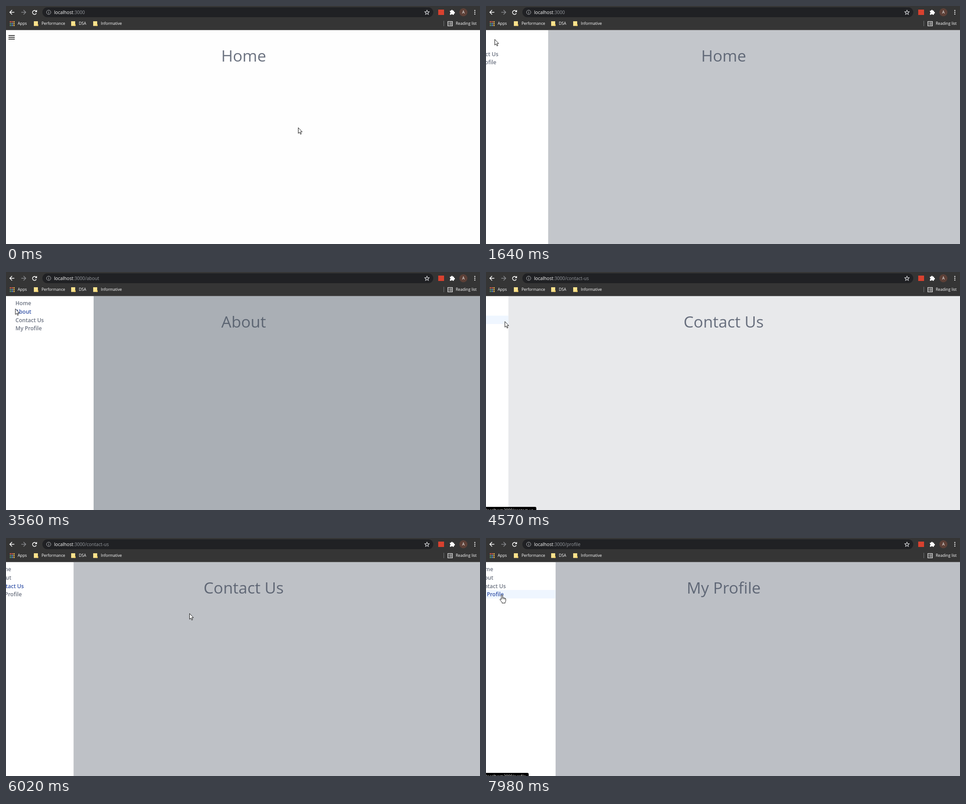
An HTML page with a canvas that plays this animation: 1055 by 531 pixels, repeating every 8000 ms.

```html
<!DOCTYPE html>
<html lang="en">
<head>
<meta charset="utf-8">
<title>Drawer navigation</title>
<style>
html, body { margin: 0; width: 100%; height: 100%; overflow: hidden; background: #fff; }
canvas { display: block; }
</style>
</head>
<body>
<canvas id="stage" width="1055" height="531"></canvas>
<script>
const W = 1055, H = 531, LOOP = 8000, TOP = 54;
const g = document.getElementById('stage').getContext('2d');
const FONT = '"Open Sans", "Noto Sans", sans-serif';

const DRAWER = 195, SLIDE = 300, DIM = 0.47, ROW = 18.7;
const MENU = ['Home', 'About', 'Contact Us', 'My Profile'];
const PATHS = ['', '/about', '/contact-us', '/profile'];

// Clicks that open or close the drawer, and the page after each one.
const CLICKS = [
  { t: 1505, open: true, page: 0 },
  { t: 2390, open: false, page: 1 },
  { t: 3080, open: true, page: 1 },
  { t: 4428, open: false, page: 2 },
  { t: 5090, open: true, page: 2 },
  { t: 5947, open: false, page: 2 },
  { t: 6920, open: true, page: 2 },
  { t: 7910, open: false, page: 3 }
];

// Pointer stops: time, x, y
const POINTER = [
  [0, 650, 271], [240, 650, 271], [490, 181, 130], [780, 181, 130],
  [1320, 16, 72], [1570, 19, 74], [1700, 19, 74], [2110, 40, 91],
  [2450, 40, 91], [2800, 16, 76], [3420, 16, 76], [3960, 42, 109],
  [4400, 42, 109], [4500, 41.5, 110], [4660, 41.5, 110], [4950, 13, 72],
  [5390, 13, 72], [5850, 408, 168], [6190, 408, 168], [6600, 13, 70],
  [6700, 9.5, 68], [7130, 9.5, 68], [7510, 35.5, 126], [8000, 35.5, 126]
];
const HAND = [[1300, 1600], [2020, 2480], [2740, 3240], [3820, 4510],
  [4880, 5240], [6540, 7060], [7400, 8000]];

// Menu row, from, to
const HOVER = [[1, 2000, 2560], [2, 3820, 4720], [3, 7400, 8000]];
const FOCUS = [[1, 2000, 3820], [2, 3820, 6250], [3, 7400, 8000]];
// Page, from, to, width of the status bubble
const STATUS = [[1, 2310, 2990, 350], [2, 3900, 4750, 112], [3, 7510, 8000, 95]];

const within = (list, t) => list.find(s => t >= s[1] && t < s[2]);

function ease(x) {
  // cubic-bezier(.4, 0, .2, 1)
  let lo = 0, hi = 1;
  for (let i = 0; i < 24; i++) {
    const s = (lo + hi) / 2, r = 1 - s;
    if (1.2 * r * r * s + 0.6 * r * s * s + s * s * s < x) lo = s; else hi = s;
  }
  return lo * lo * (3 - 2 * lo);
}

function drawerState(t) {
  const last = CLICKS.filter(c => c.t <= t).pop();
  if (!last) return { p: 0, page: 0 };
  const k = ease(Math.min(1, (t - last.t) / SLIDE));
  return { p: last.open ? k : 1 - k, page: last.page };
}

function pointerAt(t) {
  const i = POINTER.findIndex(p => p[0] > t);
  const [t0, x0, y0] = POINTER[i - 1], [t1, x1, y1] = POINTER[i];
  const u = (t - t0) / (t1 - t0), k = u * u * (3 - 2 * u);
  return [x0 + (x1 - x0) * k, y0 + (y1 - y0) * k];
}

function rect(x, y, w, h, color) {
  g.fillStyle = color;
  g.fillRect(x, y, w, h);
}

function disc(x, y, r, color) {
  g.fillStyle = color;
  g.beginPath();
  g.arc(x, y, r, 0, Math.PI * 2);
  g.fill();
}

function text(s, x, y, size, color, weight = 400, align = 'left') {
  g.font = `${weight} ${size}px ${FONT}`;
  g.textAlign = align;
  g.fillStyle = color;
  g.fillText(s, x, y);
  return x + g.measureText(s).width;
}

function stroke(d, color, width = 1) {
  g.strokeStyle = color;
  g.lineWidth = width;
  g.stroke(new Path2D(d));
}

function at(x, y, draw) {
  g.save();
  g.translate(x, y);
  draw();
  g.restore();
}

function arrowIcon(x, dir, color) {
  at(x, 14, () => {
    g.scale(dir, 1);
    stroke('M-5 0H5M0 -5L5 0L0 5', color, 1.6);
  });
}

function folder(x) {
  rect(x, 34, 9, 10.5, '#fbe28c');
  rect(x + 7.5, 41, 2.5, 3.5, '#efc95c');
}

function star(x, y) {
  g.beginPath();
  for (let i = 0; i < 10; i++) {
    const a = i * Math.PI / 5 - Math.PI / 2, r = i % 2 ? 2.3 : 5.3;
    g.lineTo(x + r * Math.cos(a), y + r * Math.sin(a));
  }
  g.closePath();
  g.strokeStyle = '#dfe1e4';
  g.lineWidth = 1.1;
  g.stroke();
}

function browser(page) {
  rect(0, 0, W, 53, '#353535');
  rect(0, 53, W, 1, '#6a6a6a');
  g.fillStyle = '#202124';
  g.beginPath();
  g.roundRect(81, 3, 870, 22, 11);
  g.fill();

  arrowIcon(13.5, -1, '#fff');
  arrowIcon(39, 1, '#85878a');
  g.strokeStyle = '#fff';
  g.lineWidth = 1.6;
  g.beginPath();
  g.arc(63.5, 14.3, 4.4, 0.45, 5.4);
  g.stroke();
  g.fillStyle = '#fff';
  g.fill(new Path2D('M69 8.5V13.5H64Z'));

  g.strokeStyle = '#b0b3b7';
  g.lineWidth = 1;
  g.beginPath();
  g.arc(95, 14, 4.8, 0, Math.PI * 2);
  g.stroke();
  rect(94.5, 13, 1.1, 4, '#b0b3b7');
  rect(94.5, 11, 1.1, 1.2, '#b0b3b7');

  const end = text('localhost', 107, 17.7, 10.2, '#fff');
  text(':3000' + PATHS[page], end, 17.7, 10.2, '#969a9f');

  star(937, 14.5);
  rect(962, 8, 13, 12, '#d8412f');
  rect(988, 10.5, 9, 9, '#fff');
  disc(992.5, 10.3, 1.9, '#fff');
  disc(997.3, 15, 1.9, '#fff');
  disc(988, 15, 1.4, '#353535');
  disc(992.5, 19.6, 1.4, '#353535');
  disc(1018, 14, 9, '#5d4037');
  text('A', 1018, 17.2, 8.8, '#fff', 400, 'center');
  for (const y of [10, 14, 18]) disc(1043.5, y, 1.2, '#fff');

  const dots = ['#e3604f', '#e3604f', '#e9b94a', '#5fa56a', '#5b8fe0', '#e9b94a',
    '#5fa56a', '#5b8fe0', '#e9b94a'];
  dots.forEach((c, i) => rect(8.5 + i % 3 * 4, 34 + Math.floor(i / 3) * 4, 2.7, 2.7, c));
  text('Apps', 26, 42, 8.8, '#fff');
  [[62, 'Performance'], [145, 'DSA'], [194, 'Informative']].forEach(([x, s]) => {
    folder(x);
    text(s, x + 17, 42, 8.7, '#fff');
  });
  rect(974, 33, 1, 12, '#77797c');
  stroke('M983.5 34.5H993.5V44.5H983.5Z', '#fff', 1.2);
  stroke('M985.3 37H986.5M987.5 37H992M985.3 39.5H986.5M987.5 39.5H992M985.3 42H986.5M987.5 42H992', '#fff');
  text('Reading list', 1001, 42, 8.7, '#fff');
}

function drawer(p, t) {
  if (p <= 0) return;
  const edge = DRAWER * p;
  rect(0, TOP, W, H - TOP, `rgba(75,85,99,${DIM * p})`);
  rect(0, TOP, edge, H - TOP, '#fff');
  const hover = within(HOVER, t), focus = within(FOCUS, t);
  if (hover) rect(0, 60 + hover[0] * ROW, edge, ROW, '#eff6ff');
  MENU.forEach((s, i) => {
    const color = focus && focus[0] === i ? '#3554a8' : '#6b7280';
    text(s, edge - 174, 74.2 + i * ROW, 12.1, color, 600);
  });
}

function status(t) {
  const s = within(STATUS, t);
  if (!s) return;
  g.fillStyle = '#000';
  g.beginPath();
  g.roundRect(-4, 524, s[3] + 4, 12, 3);
  g.fill();
  text('localhost:3000' + PATHS[s[0]], 0, 535, 8.8, '#fff');
}

const ARROW = new Path2D('M.5 .5V13.2L3.4 10.6L5.4 15.2L7.4 14.3L5.4 9.8H9.3Z');
const FINGER = new Path2D('M3.6 11.2V2.1Q3.6 .6 5 .6Q6.4 .6 6.4 2.1V7Q8.6 6 9 7.6' +
  'Q10.9 6.8 11.3 8.5Q13.5 8.2 13.5 10.2V13.5Q13.5 16 12 17.2V19.2H5.2V17.4' +
  'L1 12.4Q0 10.8 1.2 10.2Q2.2 9.7 3.6 11.2Z');

function pointer(t) {
  const [x, y] = pointerAt(t);
  const hand = HAND.some(([a, b]) => t >= a && t < b);
  at(hand ? x - 5 : x, y, () => {
    const shape = hand ? FINGER : ARROW;
    g.fillStyle = '#fff';
    g.strokeStyle = '#111';
    g.lineWidth = 1;
    g.fill(shape);
    g.stroke(shape);
    if (hand) stroke('M6.4 7V10.5M9 8V10.5M11.3 9V11', '#111', 0.9);
  });
}

function draw(t) {
  const { p, page } = drawerState(t);
  rect(0, 0, W, H, '#fefefe');
  for (const y of [65, 69, 73]) rect(5.5, y, 14, 1.6, '#111');
  text(MENU[page], 529, 124, 35.3, '#6b7280', 400, 'center');
  drawer(p, t);
  status(t);
  browser(page);
  pointer(t);
}

const start = performance.now();
function frame() {
  draw((performance.now() - start) % LOOP);
  requestAnimationFrame(frame);
}
frame();
</script>
</body>
</html>
```
